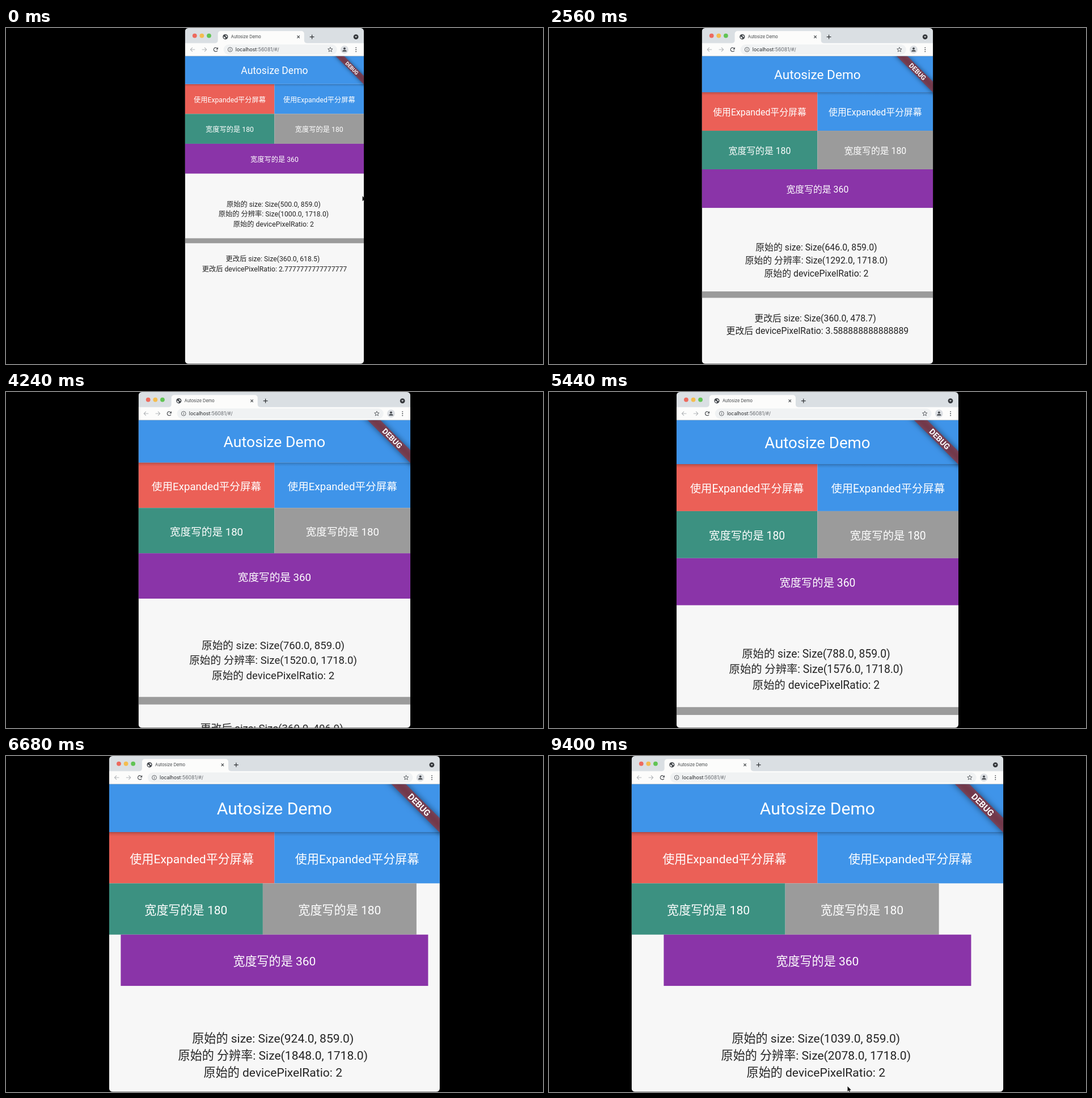
An HTML page with a canvas that plays this animation: 947 by 592 pixels, repeating every 9520 ms.

```html
<!DOCTYPE html>
<html lang="zh-CN">
<head>
<meta charset="utf-8">
<title>Autosize Demo</title>
<style>
html, body { margin: 0; width: 100%; height: 100%; overflow: hidden; background: #000; }
canvas { display: block; width: 947px; height: 592px; }
</style>
</head>
<body>
<canvas id="stage" width="947" height="592"></canvas>
<script>
const ctx = document.getElementById('stage').getContext('2d');
const LOOP = 9520;
const ZOOM = 0.631;         // stage pixels per logical pixel
const CX = 473.4;           // window centre
const TOP = 49.7;           // top of the page area
const VIEW_H = 859;         // logical page height
const BOTTOM = TOP + VIEW_H * ZOOM;
const APP = 'Roboto, "Noto Sans CJK SC", "Noto Sans CJK", sans-serif';
const UI = 'Inter, sans-serif';

// [time, logical width] while the window is being dragged wider
const WIDTHS = [[240, 500], [1000, 535], [1480, 555], [1920, 596], [2560, 646], [2960, 675],
  [3560, 729], [4600, 779], [5440, 788], [5560, 795], [5680, 808], [5840, 814], [6120, 830],
  [6400, 884], [6680, 924], [6880, 944], [7040, 975], [7240, 1004], [7440, 1033], [7640, 1039]];
// [first, last, steps] of evenly spaced repaints, then single ones
const BURSTS = [[80, 1000, 14], [1080, 1480, 5], [1560, 1920, 4], [2040, 2560, 6],
  [2640, 2960, 4], [3040, 3560, 6], [3720, 4600, 10], [4680, 5440, 9]];
const SINGLES = [5560, 5680, 5840, 6000, 6120, 6280, 6400, 6560, 6680, 6880, 7040, 7240, 7440, 7640];
const POINTER = [[7960, 799, 300], [8880, 560, 553], [9400, 526.5, 582]];

const ticks = [0];
for (const [a, b, n] of BURSTS) {
  for (let i = 0; i < n; i++) ticks.push(Math.round((a + (b - a) * i / (n - 1)) / 40) * 40);
}
ticks.push(...SINGLES);

function lastTick(t) {
  let r = 0;
  for (const k of ticks) if (k <= t) r = k;
  return r;
}

function track(keys, t, col) {
  if (t <= keys[0][0]) return keys[0][col];
  for (let i = 1; i < keys.length; i++) {
    const a = keys[i - 1], b = keys[i];
    if (t <= b[0]) return a[col] + (b[col] - a[col]) * (t - a[0]) / (b[0] - a[0]);
  }
  return keys[keys.length - 1][col];
}

function rect(x, y, w, h, color) {
  ctx.fillStyle = color;
  ctx.fillRect(x, y, w, h);
}

function disc(x, y, r, color) {
  ctx.fillStyle = color;
  ctx.beginPath();
  ctx.arc(x, y, r, 0, 7);
  ctx.fill();
}

function poly(pts, color) {
  ctx.fillStyle = color;
  ctx.beginPath();
  pts.forEach(([x, y]) => ctx.lineTo(x, y));
  ctx.closePath();
  ctx.fill();
}

function lines(color, width, ...paths) {
  ctx.strokeStyle = color;
  ctx.lineWidth = width;
  ctx.beginPath();
  for (const p of paths) p.forEach(([x, y], i) => i ? ctx.lineTo(x, y) : ctx.moveTo(x, y));
  ctx.stroke();
}

function text(str, x, y, font, color, align = 'center') {
  ctx.font = font;
  ctx.fillStyle = color;
  ctx.textAlign = align;
  ctx.fillText(str, x, y);
  return ctx.measureText(str).width;
}

function drawTabs(L, R) {
  rect(L, 0, R - L, 27, '#dadfe3');
  ['#ed6a5e', '#f4bd4f', '#61c454'].forEach((c, i) => disc(L + 17.1 + i * 12.6, 13.6, 3.9, c));

  const a = L + 58, b = L + 210.2, top = 5.2, base = 27, r = 5;
  ctx.fillStyle = '#fcfcfb';
  ctx.beginPath();
  ctx.moveTo(a - r, base);
  ctx.arcTo(a, base, a, base - r, r);
  ctx.arcTo(a, top, a + r, top, r);
  ctx.arcTo(b, top, b, top + r, r);
  ctx.lineTo(b, base - r);
  ctx.arcTo(b, base, b + r, base, r);
  ctx.fill();

  const y = 15.6, g = L + 71.2;
  disc(g, y, 4.6, '#43474b');
  poly([[g - 3.4, y - 0.6], [g - 0.8, y + 0.4], [g + 0.2, y + 2], [g - 0.6, y + 3.5], [g - 2.8, y + 2.2]], '#f4f5f6');
  poly([[g - 0.4, y - 3.4], [g + 2.6, y - 2], [g + 3.3, y + 0.6], [g + 1.3, y + 0.2], [g + 0.6, y - 1.4]], '#f4f5f6');
  text('Autosize Demo', L + 81.2, 18.2, '7.4px ' + UI, '#3d4043', 'left');

  const x = L + 200, p = L + 224;
  lines('#3c4043', 1.1, [[x - 2.2, y - 2.2], [x + 2.2, y + 2.2]], [[x + 2.2, y - 2.2], [x - 2.2, y + 2.2]]);
  lines('#303336', 1.2, [[p - 3.9, y], [p + 3.9, y]], [[p, y - 3.9], [p, y + 3.9]]);
  disc(R - 14, y, 4.4, '#34373b');
  poly([[R - 16.1, y - 1], [R - 11.9, y - 1], [R - 14, y + 1.5]], '#e6e9ec');
}

function arrow(x, y, dir, color) {
  lines(color, 1.1, [[x - 4, y], [x + 4, y]],
    [[x + dir * 0.4, y - 3.6], [x + dir * 4, y], [x + dir * 0.4, y + 3.6]]);
}

function drawToolbar(L, R) {
  const y = 38;
  rect(L, 26.7, R - L, TOP - 26.7, '#fcfcfb');
  arrow(L + 13.6, y, -1, '#b4b7ba');
  arrow(L + 34, y, 1, '#b4b7ba');

  ctx.strokeStyle = '#4a4d51';
  ctx.lineWidth = 1.2;
  ctx.beginPath();
  ctx.arc(L + 54.2, y, 3.5, 0.5, 5.4);
  ctx.stroke();
  poly([[L + 58.3, y - 4.2], [L + 58.3, y - 0.3], [L + 54.5, y - 0.3]], '#4a4d51');

  ctx.fillStyle = '#f0f2f3';
  ctx.beginPath();
  ctx.roundRect(L + 68, 29, R - L - 115.5, 18, 9);
  ctx.fill();

  const i = L + 79.6;
  ctx.strokeStyle = '#55595d';
  ctx.lineWidth = 0.9;
  ctx.beginPath();
  ctx.arc(i, y, 3.9, 0, 7);
  ctx.stroke();
  rect(i - 0.5, y - 0.5, 1, 2.6, '#55595d');
  rect(i - 0.5, y - 2.2, 1, 1, '#55595d');

  const font = '8.75px ' + UI;
  const w = text('localhost', L + 89.2, 41.1, font, '#25282b', 'left');
  text(':56081/#/', L + 89.2 + w, 41.1, font, '#65696e', 'left');

  const sx = R - 59.3, star = [];
  for (let k = 0; k <= 10; k++) {
    const r = k % 2 ? 1.9 : 4.4, a = k * Math.PI / 5 - Math.PI / 2;
    star.push([sx + r * Math.cos(a), y + 0.2 + r * Math.sin(a)]);
  }
  lines('#505458', 0.9, star);

  const u = R - 34.2;
  disc(u, y, 6.9, '#dcdfe3');
  disc(u, y - 1.8, 1.9, '#45494e');
  ctx.beginPath();
  ctx.ellipse(u, y + 3.4, 3.8, 2.6, 0, Math.PI, 0);
  ctx.fill();
  for (const d of [-3.4, 0, 3.4]) disc(R - 13.9, y + d, 0.95, '#4a4d51');
}

function drawBanner(R, s) {
  ctx.save();
  ctx.translate(R, TOP);
  ctx.rotate(Math.PI / 4);
  ctx.scale(s, s);
  // the caster sits off stage so that only its shadow shows
  ctx.save();
  ctx.shadowColor = 'rgba(0,0,0,0.5)';
  ctx.shadowBlur = 7.9 * s;
  ctx.shadowOffsetX = 3000;
  const d = 3000 / s * Math.SQRT1_2;
  rect(-60 - d, 28 + d, 120, 12, '#000');
  ctx.restore();
  rect(-60, 28, 120, 12, 'rgba(162,42,42,0.627)');
  text('DEBUG', 0, 37.6, '700 10.2px ' + APP, '#fff');
  ctx.restore();
}

function drawPage(L, R, w) {
  const short = Math.min(w, VIEW_H);
  const s = short / 360 * ZOOM;
  const W = R - L;
  const at = u => TOP + u * s;
  const body = 14 * s + 'px ' + APP;
  const box = (x, u, bw, color, label) => {
    rect(x, at(u), bw, 60 * s, color);
    text(label, x + bw / 2, at(u + 36.4), body, '#fff');
  };

  rect(L, TOP, W, BOTTOM - TOP, '#f7f7f7');
  box(L, 56, W / 2, '#eb6057', '使用Expanded平分屏幕');
  box(L + W / 2, 56, W / 2, '#3f94e9', '使用Expanded平分屏幕');
  box(L, 116, 180 * s, '#3c9181', '宽度写的是 180');
  box(L + 180 * s, 116, 180 * s, '#9b9b9b', '宽度写的是 180');
  box(CX - 180 * s, 176, 360 * s, '#8a34a8', '宽度写的是 360');

  const f = v => v.toFixed(1);
  const row = (str, u, spaces) => {
    ctx.font = body;
    const shift = ctx.measureText(' ').width * spaces / 2;
    text(str, CX - shift, at(u + 16.5), body, '#242424');
  };
  row(`原始的 size: Size(${f(w)}, ${f(VIEW_H)})`, 286, 1);
  row(`原始的 分辨率: Size(${f(w * 2)}, ${f(VIEW_H * 2)})`, 306, 1);
  row('原始的 devicePixelRatio: 2', 326, 1);
  rect(L, at(366), W, 10 * s, '#9b9b9b');
  const k = 360 / short;
  row(`更改后 size: Size(${f(w * k)}, ${f(VIEW_H * k)})`, 396, 2);
  row('更改后 devicePixelRatio: ' + 2 * short / 360, 416, 0);

  const y = at(56), shade = ctx.createLinearGradient(0, y, 0, y + 5 * s);
  shade.addColorStop(0, 'rgba(0,0,0,0.26)');
  shade.addColorStop(0.4, 'rgba(0,0,0,0.1)');
  shade.addColorStop(1, 'rgba(0,0,0,0)');
  rect(L, y, W, 5 * s, shade);
  rect(L, TOP, W, 56 * s, '#3f94e9');
  text('Autosize Demo', CX, at(35.5), 20 * s + 'px ' + APP, '#fff');

  ctx.save();
  ctx.beginPath();
  ctx.rect(L, TOP, W, BOTTOM - TOP);
  ctx.clip();
  drawBanner(R, s);
  ctx.restore();
}

function drawPointer(x, y) {
  ctx.save();
  ctx.translate(x, y);
  const shape = [[0, 0], [0, 9.2], [2.1, 7.3], [3.5, 10.4], [5, 9.7], [3.6, 6.7], [6.4, 6.5]];
  ctx.lineJoin = 'round';
  lines('#fff', 1.2, [...shape, shape[0]]);
  poly(shape, '#111');
  ctx.restore();
}

function draw(t) {
  const w = Math.round(track(WIDTHS, lastTick(t), 1));
  const L = CX - w * ZOOM / 2, R = CX + w * ZOOM / 2;
  rect(0, 0, 947, 592, '#000');
  ctx.save();
  ctx.beginPath();
  ctx.roundRect(L, 0, R - L, BOTTOM, 6);
  ctx.clip();
  drawTabs(L, R);
  drawToolbar(L, R);
  drawPage(L, R, w);
  if (t < 240) drawPointer(628.6, 296);
  if (t >= 7960) drawPointer(track(POINTER, t, 1), track(POINTER, t, 2));
  ctx.restore();
}

function loop() {
  draw(performance.now() % LOOP);
  requestAnimationFrame(loop);
}
loop();
</script>
</body>
</html>
```
